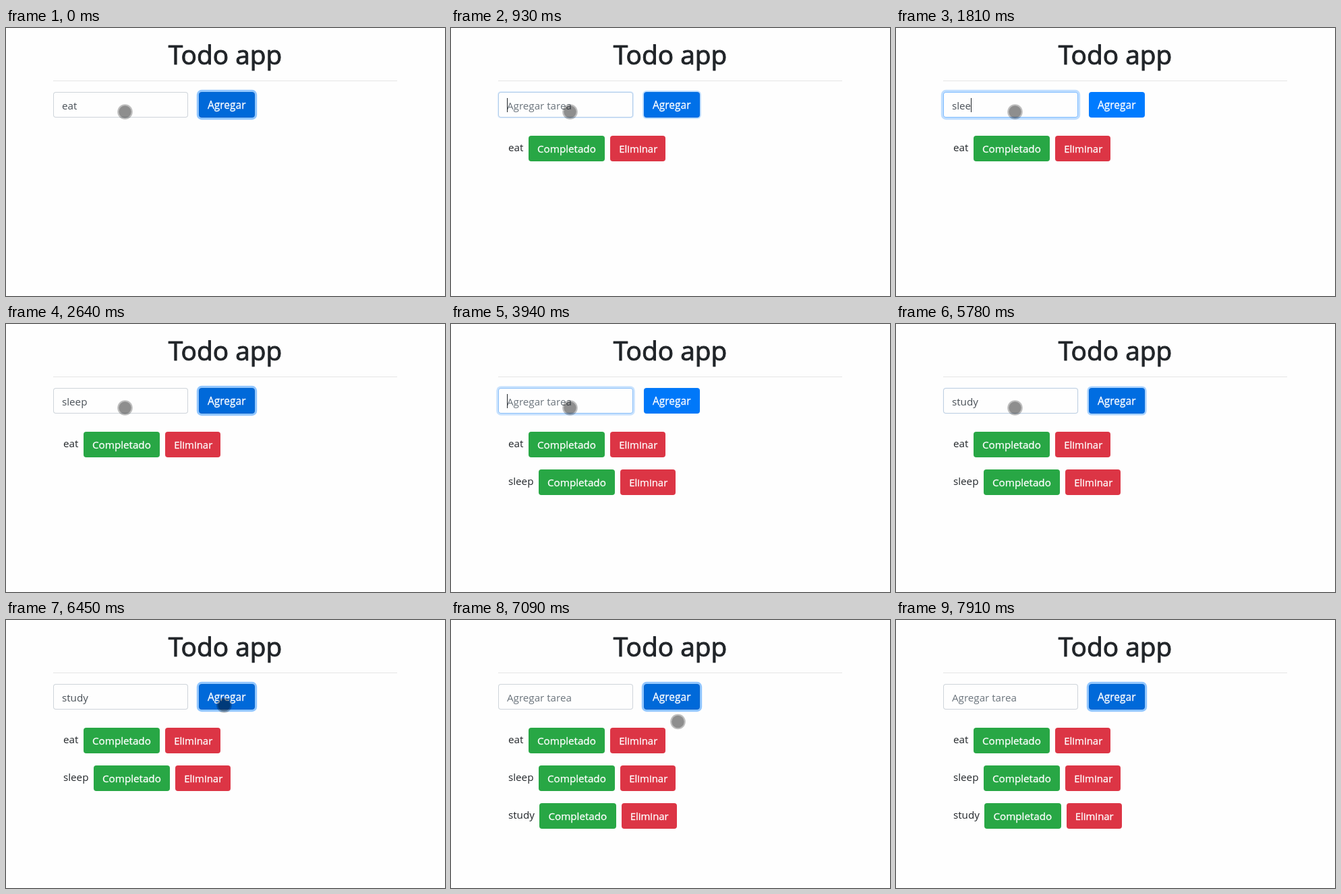
Animation, 651 px wide and 398 px high, one loop 8 s. Source, as an HTML page with a canvas:

```html
<!DOCTYPE html>
<html lang="es">
<head>
<meta charset="utf-8">
<title>Todo app</title>
<style>
  html, body { margin: 0; width: 100%; height: 100%; overflow: hidden; background: #fefefe; }
  canvas { display: block; width: 651px; height: 398px; }
</style>
</head>
<body>
<canvas id="stage"></canvas>
<script>
const W = 651, H = 398, LOOP = 8000;
const FAMILY = '"Open Sans", "Noto Sans", sans-serif';
const canvas = document.getElementById('stage');
const ctx = canvas.getContext('2d');
const dpr = window.devicePixelRatio || 1;
canvas.width = W * dpr;
canvas.height = H * dpr;

// Each track holds [start time, value] steps.
const typed = [
  [0, 'eat'], [150, ''], [1230, 's'], [1540, 'sl'], [1660, 'sle'], [1810, 'slee'], [2090, 'sleep'],
  [3070, ''], [4180, 's'], [4860, 'st'], [4980, 'stu'], [5130, 'stud'], [5380, 'study'], [6700, '']
];
// 0: button focused, 1: input focused
const focus = [
  [0, 0], [930, .4], [1080, 1], [2490, .5], [2640, 0],
  [3940, .85], [4060, 1], [5660, .7], [5780, .2], [5900, 0]
];
const caret = [
  [0, false], [930, true], [2490, false], [3940, true], [4610, false], [4860, true], [5660, false]
];
const pointer = [
  [0, [176.5, 124.5]], [6150, null], [6300, [291.5, 126.5]], [6450, [323.5, 126.5]],
  [6700, [326, 129]], [6820, [330, 134]], [6940, [333.5, 138.5]], [7090, [336.5, 151]],
  [7210, [333.5, 159.5]], [7360, null], [7640, [201.5, 186.5]], [7790, [201.5, 184.5]], [7910, null]
];
const tasks = [
  { name: 'eat', from: 150, x: 115 },
  { name: 'sleep', from: 3070, x: 130 },
  { name: 'study', from: 6700, x: 131.4 }
];

function at(track, t) {
  let value = track[0][1];
  for (const [start, v] of track) if (t >= start) value = v;
  return value;
}

function mix(a, b, p) {
  return `rgb(${a.map((v, i) => Math.round(v + (b[i] - v) * p))})`;
}

function box(x, y, w, h, r, fill) {
  ctx.fillStyle = fill;
  ctx.beginPath();
  ctx.roundRect(x, y, w, h, r);
  ctx.fill();
}

// A thin outline of the same colour gives the heavier weights.
function text(str, x, y, color, size = 15.2, outline = 0) {
  ctx.font = `400 ${size}px ${FAMILY}`;
  ctx.fillStyle = ctx.strokeStyle = color;
  ctx.fillText(str, x, y);
  if (!outline) return;
  ctx.lineWidth = outline;
  ctx.lineJoin = 'round';
  ctx.strokeText(str, x, y);
}

function ring(x, y, w, h, amount, rgb, alpha) {
  if (amount <= 0) return;
  const s = 3.2 * amount;
  box(x - s, y - s, w + 2 * s, h + 2 * s, 4 + s, `rgba(${rgb},${alpha * amount})`);
  box(x, y, w, h, 4, '#fefefe');
}

function drawHeader() {
  ctx.textAlign = 'center';
  text('Todo app', 325, 54, '#212529', 38.8, 1);
  ctx.textAlign = 'left';
  ctx.fillStyle = '#e5e5e5';
  ctx.fillRect(70, 78, 510, 1);
}

function drawInput(t, p) {
  const value = at(typed, t);
  ring(70, 95, 200, 38, p, '0,123,255', .25);
  box(70, 95, 200, 38, 4, mix([206, 212, 218], [128, 189, 255], p));
  box(71, 96, 198, 36, 3, '#fefefe');
  text(value || 'Agregar tarea', 83, 121, value ? '#495057' : '#6c757d');
  if (at(caret, t)) {
    ctx.fillStyle = '#212529';
    ctx.fillRect(83 + Math.round(ctx.measureText(value).width), 104, 1, 21);
  }
}

function drawAdd(p) {
  ring(286, 95, 83, 38, 1 - p, '38,143,255', .5);
  box(286, 95, 83, 38, 4, mix([0, 98, 204], [0, 123, 255], p));
  box(287, 96, 81, 36, 3, mix([0, 105, 217], [0, 123, 255], p));
  text('Agregar', 299, 120, '#fff', 15.5, .3);
}

function taskButton(label, x, y, w, color, size) {
  const left = Math.round(x);
  box(left, y, Math.round(x + w) - left, 38, 4, color);
  text(label, x + 13, y + 25, '#fff', size, .3);
}

function drawTask({ name, x }, row) {
  const y = 160 + row * 56;
  text(name, 85, y + 23, '#212529');
  taskButton('Completado', x, y, 113.3, '#28a745', 15.2);
  taskButton('Eliminar', x + 121.3, y, 82, '#dc3545', 14.9);
}

function drawPointer(pos) {
  if (!pos) return;
  const disc = (r, alpha) => {
    ctx.fillStyle = `rgba(0,0,0,${alpha})`;
    ctx.beginPath();
    ctx.arc(pos[0], pos[1], r, 0, Math.PI * 2);
    ctx.fill();
  };
  disc(11.3, .25);
  disc(9.2, .25);
}

function draw(now) {
  const t = now % LOOP;
  const p = at(focus, t);
  ctx.setTransform(dpr, 0, 0, dpr, 0, 0);
  ctx.fillStyle = '#fefefe';
  ctx.fillRect(0, 0, W, H);
  drawHeader();
  drawInput(t, p);
  drawAdd(p);
  tasks.forEach((task, i) => { if (t >= task.from) drawTask(task, i); });
  drawPointer(at(pointer, t));
}

const start = performance.now();
function tick() {
  draw(performance.now() - start);
  requestAnimationFrame(tick);
}
tick();
</script>
</body>
</html>
```
